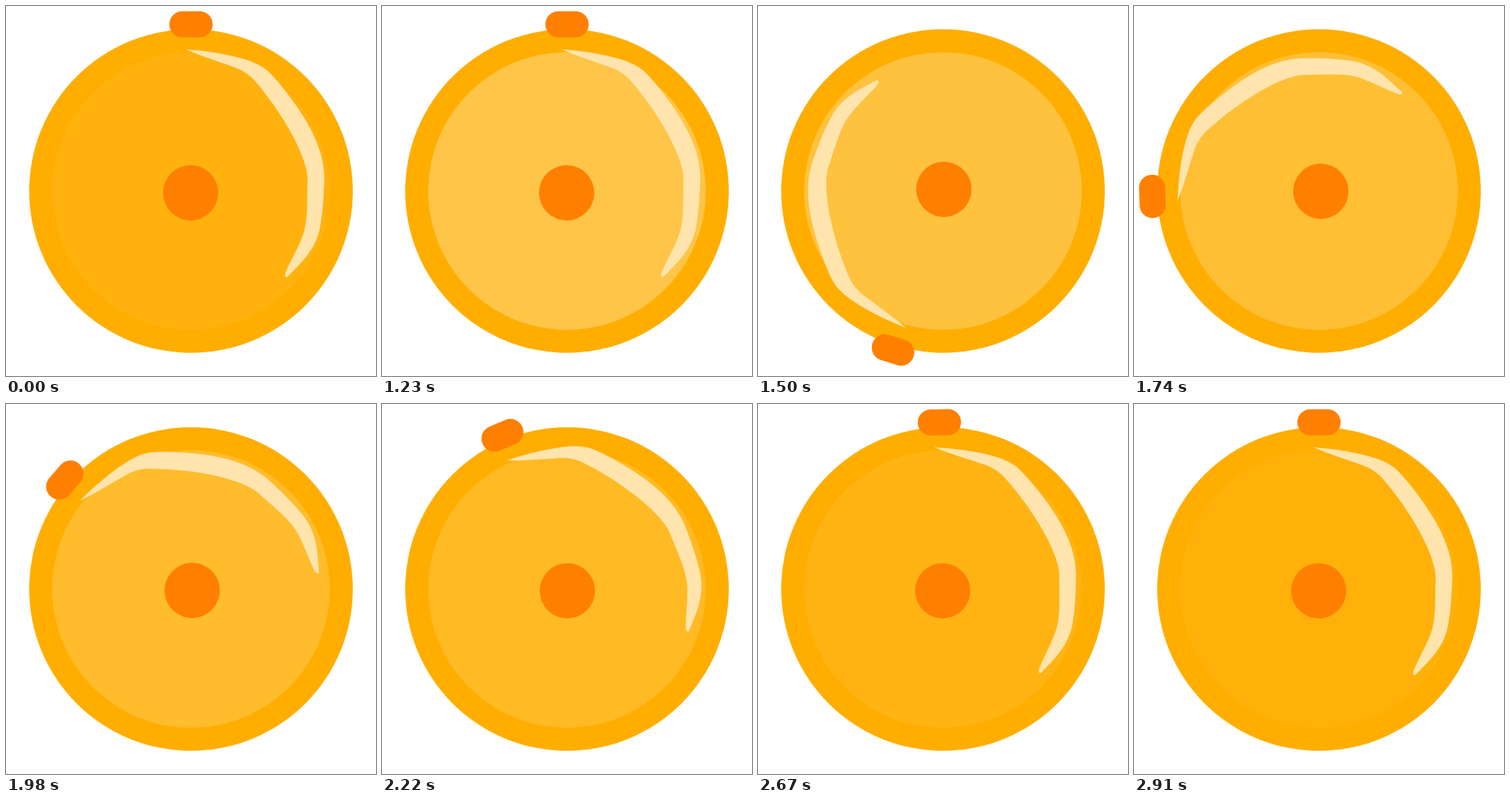
Animation, 530 px wide and 530 px high, one loop 8 s. Source, as an HTML page:

```html
<!DOCTYPE html>
<html>
<head>
<meta charset="utf-8">
<style>
  html, body { margin: 0; width: 100%; height: 100%; overflow: hidden; background: #fff; }
  svg { display: block; width: 100%; height: 100%; }
</style>
</head>
<body>
<svg viewBox="0 0 530 530">
  <circle cx="265" cy="265" r="231.8" fill="#ffae00"/>
  <circle id="glow" cx="265" cy="265" r="198.8" fill="#fff"/>
  <g id="spinner">
    <path fill="#ffe4ad" d="M257 62 C300 65 345 74 365 86 C376 92 383 101 390 109
      C425 152 456 198 456 247 C455 272 454 297 449 321 C442 351 422 369 403 388
      Q399 390 400 383 C408 363 421 343 427 323 C433 302 431 272 432 247
      C431 214 395 152 358 109 C350 99 338 91 325 87 C303 79 280 72 257 62Z"/>
    <circle cx="264.5" cy="267.6" r="39.6" fill="#ff8000"/>
    <rect x="234" y="7.5" width="62" height="37.5" rx="18.5" fill="#ff8000"/>
  </g>
</svg>
<script>
const LOOP = 8000, STEP = 30;
const START = 1230, SPIN = 1590, FADE = 1680;
const glow = document.getElementById('glow');
const spinner = document.getElementById('spinner');

const bezier = (a, b, s) => 3 * a * s * (1 - s) ** 2 + 3 * b * s * s * (1 - s) + s ** 3;

// Cubic-bezier easing (.07, .6, .4, 1), solved by bisection.
function ease(x) {
  if (x <= 0) return 0;
  if (x >= 1) return 1;
  let low = 0, high = 1;
  for (let i = 0; i < 30; i++) {
    const mid = (low + high) / 2;
    if (bezier(.07, .4, mid) < x) low = mid; else high = mid;
  }
  return bezier(.6, 1, low);
}

function draw(time) {
  const t = Math.floor((time % LOOP) / STEP) * STEP - START;
  const opacity = t < 0 ? .055 : .282 - .242 * Math.min(t / FADE, 1);
  glow.setAttribute('opacity', opacity);
  spinner.setAttribute('transform', `rotate(${360 * ease(t / SPIN)} 265 265)`);
}

const origin = performance.now();
function tick() {
  draw(performance.now() - origin);
  requestAnimationFrame(tick);
}
tick();
</script>
</body>
</html>
```
